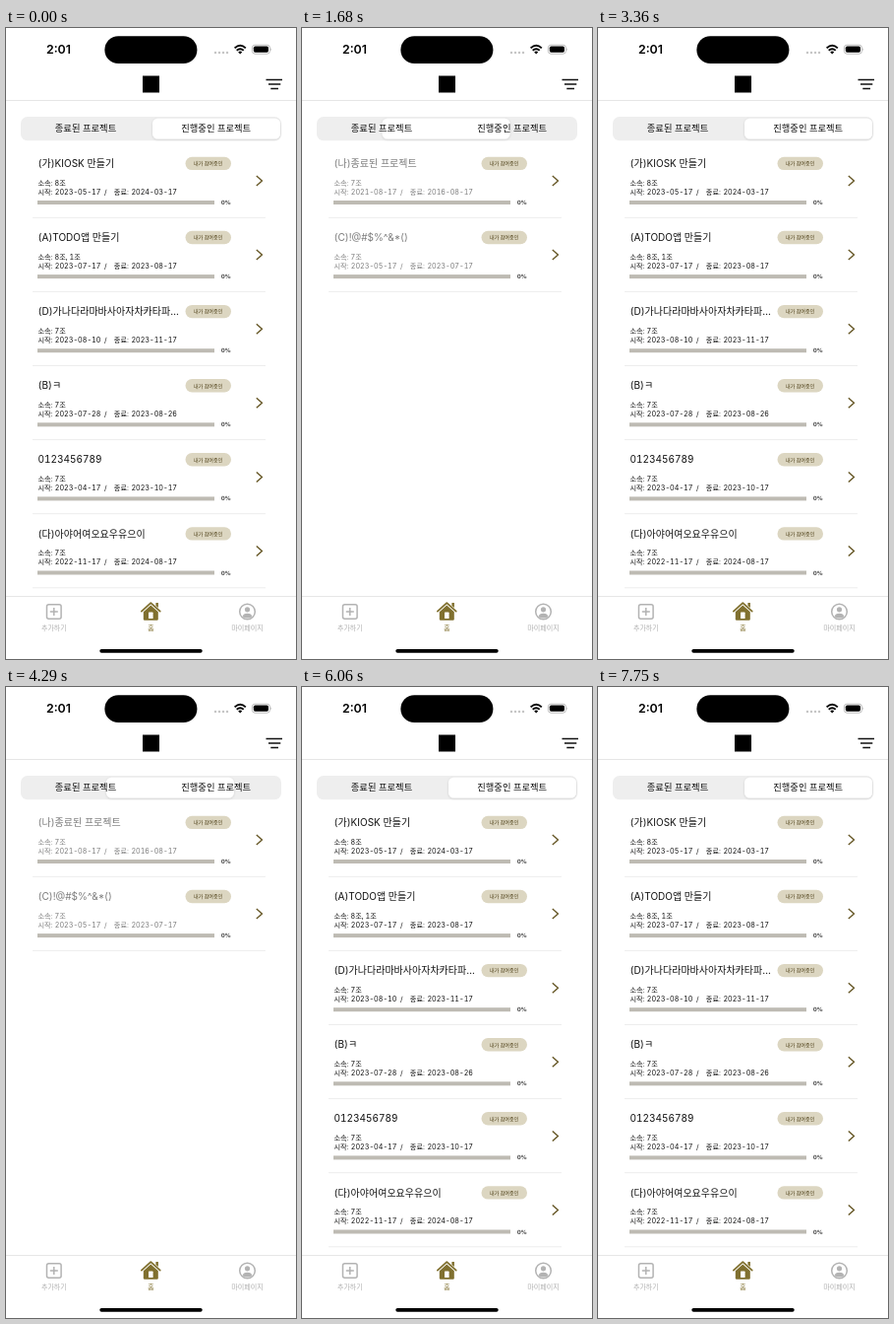
An HTML page for the animation above (7.93 s loop, 295 by 640 pixels).

```html
<!DOCTYPE html>
<html lang="ko">
<head>
<meta charset="utf-8">
<title>Project list</title>
<style>
html, body { margin: 0; width: 100%; height: 100%; overflow: hidden; background: #fff; }
svg { display: block; width: 100%; height: 100%; }
text {
  font-family: Inter, "Noto Sans CJK KR", "Noto Sans CJK", sans-serif;
  font-variant-numeric: tabular-nums;
  white-space: pre;
}
.mid { text-anchor: middle; }
.name { font-size: 10px; }
.info { font-size: 7.2px; }
.active { fill: #111; }
.ended { fill: #7c7c7c; }
.tag { font-size: 5.05px; font-weight: 500; fill: #4f4119; }
.pct { font: 700 5.8px "DejaVu Sans", sans-serif; fill: #555; }
.seg { font-size: 9.3px; fill: #0c0c0c; }
.tab { font-size: 6.9px; fill: #afafaf; }
.rule { stroke: #e6e6e6; stroke-width: 1; }
.row-rule { stroke: #ededed; stroke-width: 1; }
</style>
</head>
<body>
<svg viewBox="0 0 295 640" preserveAspectRatio="none">
  <defs>
    <filter id="shade" x="-10%" y="-30%" width="120%" height="170%">
      <feDropShadow dx="0" dy="0.7" stdDeviation="1" flood-opacity=".15"/>
    </filter>
  </defs>
  <rect width="295" height="640" fill="#fff"/>

  <g id="status">
    <text class="mid" x="53.5" y="26.3" font-size="12.4" font-weight="600" style="font-variant-numeric:normal">2:01</text>
    <rect x="100.4" y="8.2" width="94" height="27.9" rx="13.9"/>
    <g fill="#c6c6c6">
      <circle cx="213" cy="25" r="1.25"/><circle cx="217" cy="25" r="1.25"/>
      <circle cx="221" cy="25" r="1.25"/><circle cx="225" cy="25" r="1.25"/>
    </g>
    <g fill="none" stroke="#000" stroke-width="1.9">
      <path d="M232.6 20.4Q238.2 15.3 243.8 20.4"/>
      <path d="M234.7 22.8Q238.2 19.7 241.7 22.8"/>
    </g>
    <path d="M236.2 24.4Q238.2 22.8 240.2 24.4L238.2 26.6Z"/>
    <rect x="250.4" y="17.2" width="18" height="9" rx="2.8" fill="none" stroke="#aaa" stroke-width=".8"/>
    <rect x="251.8" y="18.6" width="15.2" height="6.2" rx="1.7"/>
    <path d="M269.5 20.2q1.5 1.5 0 3z" fill="#aaa"/>
  </g>

  <rect x="139" y="48.5" width="17" height="17" fill="#000"/>
  <path d="M264.5 52.5H281M267 57H279.3M269.3 61.5H277" stroke="#111" stroke-width="1.4"/>
  <path class="rule" d="M0 73.5H295"/>

  <rect x="15" y="90" width="265" height="24.2" rx="6.8" fill="#eee"/>
  <rect id="pill" y="91.8" width="130" height="20.8" rx="5.3" fill="#fff" filter="url(#shade)"/>
  <text id="segLeft" class="seg mid" x="81" y="105.3">종료된 프로젝트</text>
  <text id="segRight" class="seg mid" x="213.7" y="105.3">진행중인 프로젝트</text>

  <g id="active"></g>
  <g id="ended"></g>

  <rect y="576" width="295" height="64" fill="#fff"/>
  <path class="rule" d="M0 576.5H295"/>
  <g fill="none" stroke="#b3b3b3" stroke-width="1.5">
    <rect x="41.5" y="584.7" width="14.6" height="14.6" rx="2"/>
    <path d="M48.8 588V596M44.8 592H52.8"/>
    <circle cx="245.5" cy="592" r="7.8"/>
  </g>
  <g fill="#b3b3b3">
    <circle cx="245.5" cy="589.8" r="2.6"/>
    <path d="M240.5 597.2Q241.2 593.8 245.5 593.8Q249.8 593.8 250.5 597.2Q245.5 599.6 240.5 597.2Z"/>
  </g>
  <g fill="#80702f">
    <path d="M137.9 591.6L147.3 583.2L156.7 591.6" fill="none" stroke="#80702f" stroke-width="1.8" stroke-linecap="round" stroke-linejoin="round"/>
    <path d="M152.4 583h2.5v5l-2.5-2z"/>
    <path d="M139.8 592.2L147.3 585.6L154.8 592.2V599.6Q154.8 600.8 153.6 600.8H141Q139.8 600.8 139.8 599.6Z"/>
    <rect x="145" y="592.6" width="4.6" height="6.4" rx=".6" fill="#fff"/>
  </g>
  <text class="tab mid" x="48.8" y="611">추가하기</text>
  <text class="tab mid" x="147.3" y="611" style="fill:#80702f;font-weight:500">홈</text>
  <text class="tab mid" x="245.5" y="611" style="font-size:7.1px">마이페이지</text>
  <rect x="95.3" y="629.9" width="104.4" height="3.8" rx="1.9"/>
</svg>
<script>
const LOOP = 7930, LEFT = 16.2, RIGHT = 149, PITCH = 75.1;
const $ = id => document.getElementById(id);
const pill = $('pill');

const projects = {
  active: [
    ['(가)KIOSK 만들기', '8조', '2023-05-17', '2024-03-17'],
    ['(A)TODO앱 만들기', '8조, 1조', '2023-07-17', '2023-08-17'],
    ['(D)가나다라마바사아자차카타파…', '7조', '2023-08-10', '2023-11-17'],
    ['(B)ㅋ', '7조', '2023-07-28', '2023-08-26'],
    ['0123456789', '7조', '2023-04-17', '2023-10-17'],
    ['(다)아야어여오요우유으이', '7조', '2022-11-17', '2024-08-17']
  ],
  ended: [
    ['(나)종료된 프로젝트', '7조', '2021-08-17', '2016-08-17'],
    ['(C)!@#$%^&amp;*()', '7조', '2023-05-17', '2023-07-17']
  ]
};

const label = (cls, x, y, s) => `<text class="${cls}" x="${x}" y="${y}">${s}</text>`;

function row([name, team, from, to], i, kind) {
  const info = (x, y, s) => label('info ' + kind, x, y, s);
  return `<g transform="translate(0 ${i * PITCH})">
    ${label('name ' + kind, 32.6, 141, name)}
    ${info(32.4, 159.6, '소속: ' + team)}
    ${info(32.4, 168.5, '시작:')}${info(49.8, 168.5, from)}${info(100, 168.5, '/')}
    ${info(109.8, 168.5, '종료:')}${info(127.4, 168.5, to)}
    <rect x="182.5" y="130.7" width="46.5" height="13.4" rx="6.7" fill="#dcd6c1"/>
    ${label('tag mid', 205.7, 139.3, '내가 참여중인')}
    <path d="M254.8 150L260.4 155L254.8 160" fill="none" stroke="#665726" stroke-width="1.4"/>
    <rect x="32" y="175" width="180" height="4" fill="#bebbb3"/>
    ${label('pct', 218.7, 179.1, '0%')}
    <path class="row-rule" d="M27 192.3H264"/>
  </g>`;
}

for (const kind in projects)
  $(kind).innerHTML = projects[kind].map((p, i) => row(p, i, kind)).join('');

// Each slide: first and last change, number of steps, spring start, list swap
const slides = [
  { from: 1530, to: 2000, steps: 7, go: 1592, swap: 1595, ended: true },
  { from: 2840, to: 3360, steps: 8, go: 2895, swap: 2905, ended: false },
  { from: 4210, to: 4650, steps: 7, go: 4214, swap: 4275, ended: true },
  { from: 5700, to: 6060, steps: 6, go: 5700, swap: 5765, ended: false }
];
const press = { from: 7210, to: 7750, steps: 8 };

const spring = ms => {
  const u = Math.max(0, ms) * 0.018;
  return 1 - (1 + u) * Math.exp(-u);
};

function stepTime(t, s) {
  const d = (s.to - s.from) / (s.steps - 1);
  return Math.min(s.to, s.from + Math.floor((t - s.from) / d + 0.1) * d);
}

function render(t) {
  let ended = false, pos = 1, moving = false, scale = 1;
  for (const s of slides) {
    if (t < s.from) break;
    const now = stepTime(t, s), p = t >= s.to ? 1 : spring(now - s.go);
    pos = s.ended ? 1 - p : p;
    ended = now >= s.swap ? s.ended : !s.ended;
    moving = t < s.to && now >= s.swap;
  }
  if (t >= press.from && t < press.to) {
    const now = stepTime(t, press);
    scale = 1 - 0.05 * (spring(now - press.from + 40) - spring(now - 7340));
  }
  const x = LEFT + (RIGHT - LEFT) * pos;
  pill.setAttribute('x', x);
  pill.setAttribute('transform',
    `translate(${x + 65} 102.2) scale(${scale}) translate(${-x - 65} -102.2)`);
  $('active').style.display = ended ? 'none' : '';
  $('ended').style.display = ended ? '' : 'none';
  $('segLeft').style.fontWeight = ended || moving ? 500 : 400;
  $('segRight').style.fontWeight = !ended || moving ? 500 : 400;
}

const start = performance.now();
function tick() {
  render((performance.now() - start) % LOOP);
  requestAnimationFrame(tick);
}
tick();
</script>
</body>
</html>
```
